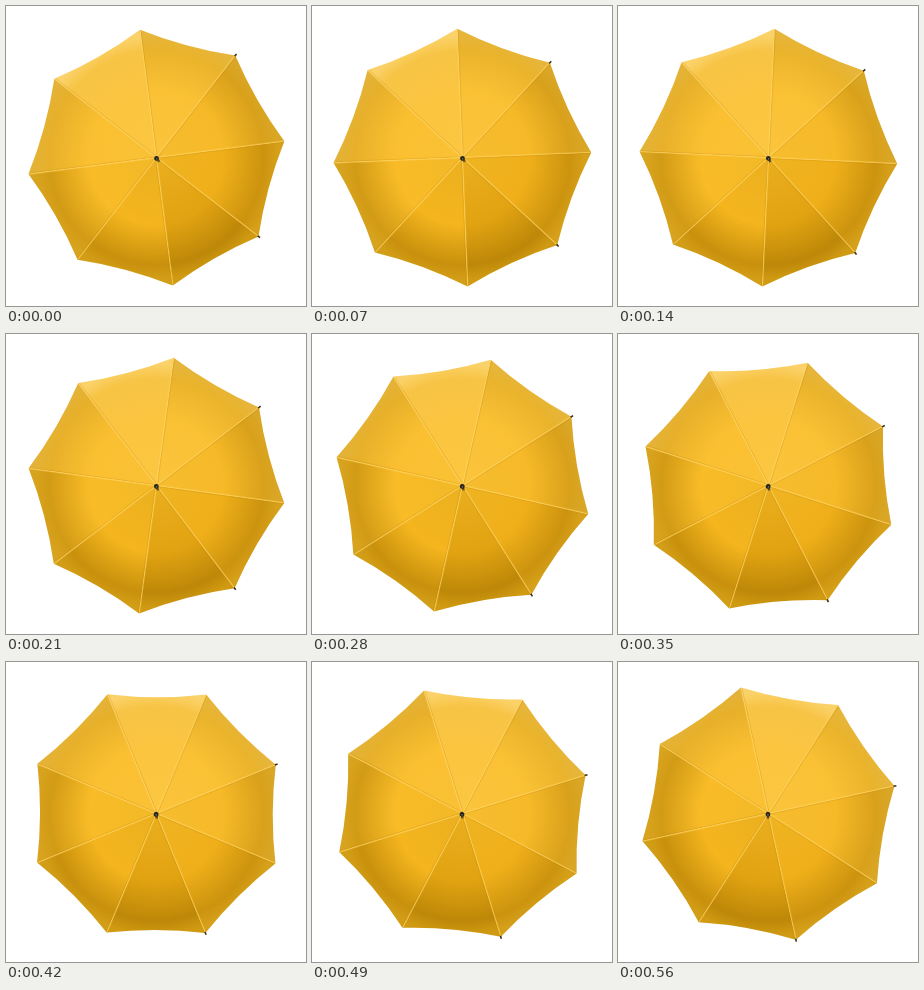
These frames come from a looping animation (300x300 px, 630 ms). An HTML page with a canvas:

```html
<!DOCTYPE html>
<html lang="en">
<head>
<meta charset="utf-8">
<title>Turning umbrella</title>
<style>
html, body { margin: 0; width: 100%; height: 100%; overflow: hidden; background: #fff; }
canvas { display: block; width: 300px; height: 300px; }
</style>
</head>
<body>
<canvas id="stage" width="300" height="300"></canvas>
<script>
const ctx = document.getElementById('stage').getContext('2d');
const STEP_MS = 70, STEPS = 9, STEP_DEG = 5, START_DEG = -7.3;
const TIP = 129, SAG_CONTROL = 113.5, PANELS = 8;
const CENTER = { x: 150.4, y: 151.6 };
const rad = deg => deg * Math.PI / 180;

// Point at radius r, angle clockwise from straight up.
const polar = (r, deg) => [r * Math.sin(rad(deg)), -r * Math.cos(rad(deg))];

// Hub, middle, shaded band and rim colour of each panel, clockwise from the top.
const PANEL_COLORS = [
  ['#fac43c', '#fac135', '#e9b32b', '#e6b53a'],
  ['#f6bd30', '#f6b928', '#d9a11b', '#d9a626'],
  ['#efb422', '#efaf1a', '#cc930e', '#d6a01a'],
  ['#eaae1e', '#e2a312', '#bd8808', '#d09a12'],
  ['#ebb020', '#f4b51e', '#c8900c', '#d39e17'],
  ['#f2b826', '#f9bc28', '#d29b15', '#d8a31e'],
  ['#fac136', '#fbc031', '#e7b02a', '#e4b236'],
  ['#fbc640', '#fbc540', '#f7c445', '#fbd26a']
];
const STOPS = [0, 0.55, 0.88, 1];

function drawPanel(index) {
  const from = index * 45;
  ctx.beginPath();
  ctx.moveTo(0, 0);
  ctx.lineTo(...polar(TIP, from));
  ctx.quadraticCurveTo(...polar(SAG_CONTROL, from + 22.5), ...polar(TIP, from + 45));
  ctx.closePath();

  const shade = ctx.createRadialGradient(0, 0, 0, 0, 0, 122);
  PANEL_COLORS[index].forEach((color, i) => shade.addColorStop(STOPS[i], color));
  ctx.fillStyle = shade;
  ctx.fill();
}

function radialLine(angle, start, end, offset, color, width) {
  const [dx, dy] = polar(offset, angle + 90);
  const [x1, y1] = polar(start, angle);
  const [x2, y2] = polar(end, angle);
  ctx.beginPath();
  ctx.moveTo(x1 + dx, y1 + dy);
  ctx.lineTo(x2 + dx, y2 + dy);
  ctx.strokeStyle = color;
  ctx.lineWidth = width;
  ctx.stroke();
}

function drawRib(index) {
  const angle = index * 45;
  radialLine(angle, 0, TIP - 1, 0.9, 'rgba(190,130,10,.25)', 1);
  radialLine(angle, 0, TIP - 1, -0.2, 'rgba(255,208,85,.6)', 1.2);
}

function dot(x, y, radius, color) {
  ctx.beginPath();
  ctx.arc(x, y, radius, 0, 2 * Math.PI);
  ctx.fillStyle = color;
  ctx.fill();
}

function drawHub() {
  radialLine(153, 1, 5, 0, '#6d541a', 2.6);
  dot(0, 0.8, 2.4, '#29251b');
  dot(0.3, 1.3, 0.7, '#8a8670');
}

function draw(time) {
  const step = Math.floor(time / STEP_MS) % STEPS;
  ctx.setTransform(1, 0, 0, 1, 0, 0);
  ctx.fillStyle = '#fff';
  ctx.fillRect(0, 0, 300, 300);
  ctx.translate(CENTER.x, CENTER.y);
  ctx.rotate(rad(START_DEG + step * STEP_DEG));
  for (let i = 0; i < PANELS; i++) drawPanel(i);
  for (let i = 0; i < PANELS; i++) drawRib(i);
  for (const i of [1, 3]) radialLine(i * 45, TIP - 1, TIP + 2, 0, '#3a3018', 1.6);
  drawHub();
}

function tick() {
  draw(performance.now());
  requestAnimationFrame(tick);
}
tick();
</script>
</body>
</html>
```
